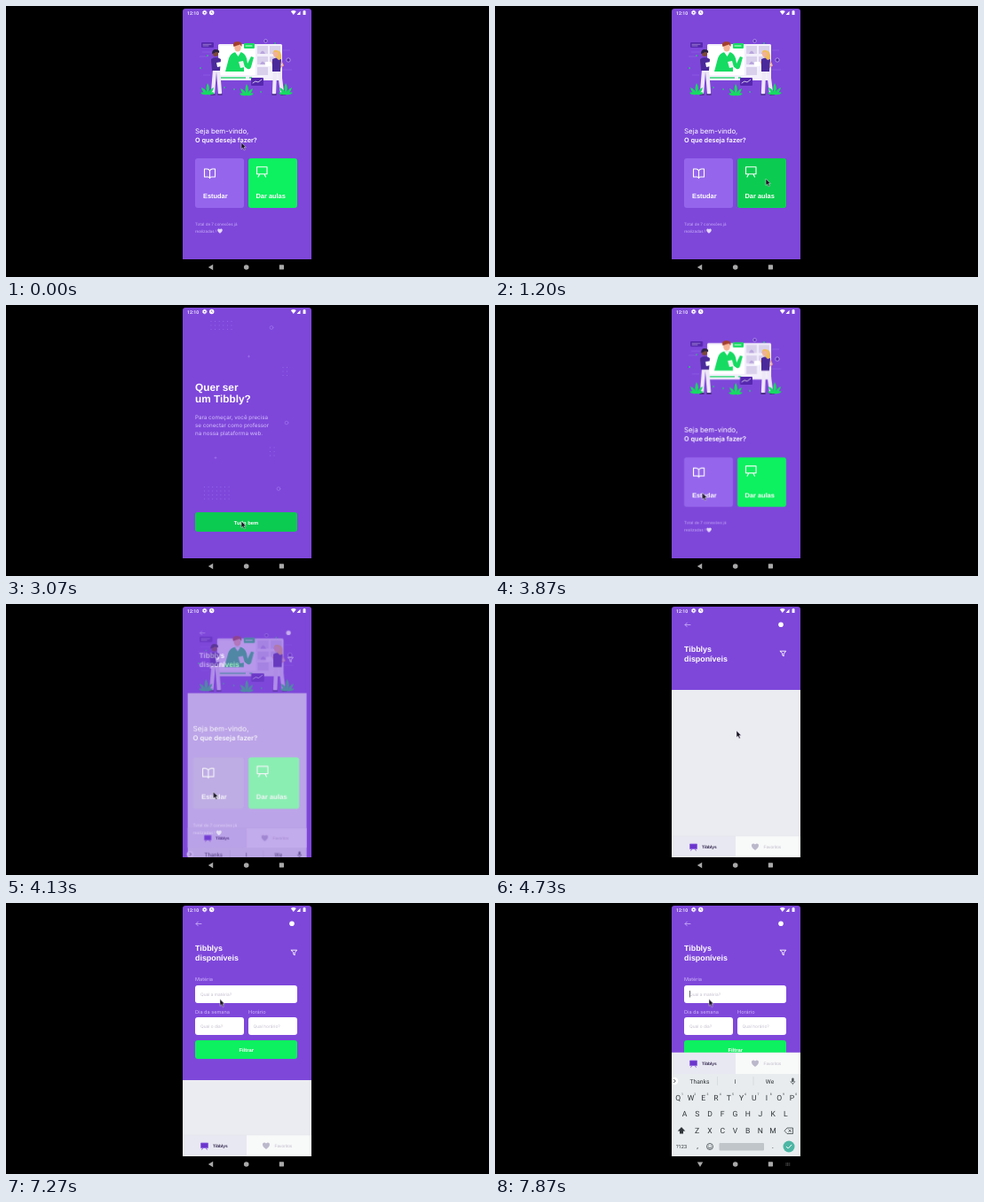
These frames come from a looping animation (544x306 px, 8 s). An HTML page:

```html
<!DOCTYPE html>
<html lang="pt-BR">
<head>
<meta charset="utf-8">
<title>App de aulas</title>
<style>
html, body { margin: 0; width: 100%; height: 100%; overflow: hidden; background: #000; }
svg { display: block; width: 544px; height: 306px; }
text { font-family: Inter, sans-serif; fill: #fff; text-rendering: geometricPrecision; white-space: pre; }
.bold { font-family: "Liberation Sans", Arial, sans-serif; font-weight: 700; }
.mid { text-anchor: middle; }
.title { font-size: 11.8px; }
.head { font-size: 8.9px; }
.label { font-size: 5.6px; fill: #cdb4f8; }
.hint { font-size: 4.8px; fill: #c4bfce; }
.tab { font-size: 4.8px; }
.keys, .keys text { font-family: Roboto, sans-serif; fill: #30363a; text-anchor: middle; }
.line { fill: none; stroke: #fff; stroke-linecap: round; stroke-linejoin: round; }
.deco { fill: none; stroke: #996de9; stroke-linecap: round; }
.purple { fill: #7e47da; }
.green { fill: #0df05f; }
.violet { fill: #9566ec; }
.dark { fill: #5527ae; }
.leaf { fill: #16db62; }

/* One loop is 120 ticks; 1 tick = 0.8333% */
.move, .scene, .press, .show { animation: 8s -5ms infinite step-end both; }
.scene { transform-origin: 271.5px 145px; }

.cursor { animation-name: cursor; }
@keyframes cursor {
  0% { transform: translate(265px, 154px); }
  6.667% { transform: translate(265px, 154px); animation-timing-function: steps(3); }
  9.167% { transform: translate(283px, 172px); animation-timing-function: steps(4); }
  12.5% { transform: translate(305px, 195px); }
  24.167% { transform: translate(253px, 146px); }
  25.833% { transform: translate(244px, 133px); }
  26.667% { transform: translate(239.5px, 125px); }
  28.333% { transform: translate(239.5px, 125px); animation-timing-function: steps(4); }
  31.667% { transform: translate(257px, 215px); animation-timing-function: steps(3); }
  34.167% { transform: translate(265px, 244px); }
  42.5% { transform: translate(265px, 244px); animation-timing-function: steps(5); }
  46.667% { transform: translate(233.5px, 212px); }
  57.5% { transform: translate(286px, 165px); }
  58.333% { transform: translate(278px, 150px); }
  59.167% { transform: translate(272px, 143px); }
  60% { transform: translate(272px, 143px); animation-timing-function: steps(4); }
  63.333% { transform: translate(250px, 120px); animation-timing-function: steps(7); }
  69.167% { transform: translate(320px, 58px); }
  79.167% { transform: translate(320px, 58px); animation-timing-function: steps(6); }
  84.167%, 88.333% { transform: translate(217px, 51px); }
  89.167% { transform: translate(230px, 85px); }
  90% { transform: translate(248px, 112px); }
  90.833%, 100% { transform: translate(241px, 108.5px); }
}

.home { animation-name: home; }
@keyframes home {
  0% { transform: none; }
  15.833% { transform: scale(1); animation-timing-function: steps(4); }
  19.167% { transform: scale(1.1); }
  39.167% { transform: scale(1.1); animation-timing-function: steps(3); }
  41.667% { transform: scale(1); }
  50% { transform: scale(1); animation-timing-function: steps(5); }
  54.167%, 100% { transform: scale(1.1); }
}
.teach { animation-name: teach; }
@keyframes teach {
  0% { opacity: 0; transform: scale(.85); }
  15.833% { opacity: 0; transform: scale(.85); animation-timing-function: steps(2); }
  17.5% { opacity: .8; transform: scale(.95); animation-timing-function: steps(2); }
  19.167% { opacity: 1; transform: scale(1); }
  39.167% { opacity: 1; transform: scale(1); animation-timing-function: steps(3); }
  41.667%, 100% { opacity: 0; transform: scale(.92); }
}
.list { animation-name: list; }
@keyframes list {
  0% { opacity: 0; transform: scale(.85); }
  50% { opacity: 0; transform: scale(.85); animation-timing-function: steps(3); }
  52.5% { opacity: .85; transform: scale(.96); animation-timing-function: steps(2); }
  54.167%, 100% { opacity: 1; transform: scale(1); }
}

.tap-teach { animation-name: tap-teach; }
@keyframes tap-teach {
  0% { opacity: 0; }
  14.167% { opacity: .08; }
  15% { opacity: .15; }
  17.5%, 100% { opacity: 0; }
}
.tap-ok { animation-name: tap-ok; }
@keyframes tap-ok {
  0% { opacity: 0; }
  37.5% { opacity: .08; }
  38.333% { opacity: .15; }
  40%, 100% { opacity: 0; }
}
.tap-study { animation-name: tap-study; }
@keyframes tap-study {
  0% { opacity: 0; }
  49.167% { opacity: .12; }
  52.5%, 100% { opacity: 0; }
}
.tap-filter { animation-name: tap-filter; }
@keyframes tap-filter {
  0% { opacity: 0; }
  73.333% { opacity: .18; }
  75.833% { opacity: .08; }
  76.667%, 100% { opacity: 0; }
}
.form { animation-name: form; }
@keyframes form {
  0% { opacity: 0; }
  75%, 100% { opacity: 1; }
}
.focus { animation-name: focus; }
@keyframes focus {
  0% { opacity: 0; }
  95.833%, 100% { opacity: 1; }
}
.blur { animation-name: blur; }
@keyframes blur {
  0% { opacity: 1; }
  95.833%, 100% { opacity: 0; }
}
.sheet { animation-name: sheet; }
@keyframes sheet {
  0% { transform: translateY(93px); }
  95.833% { transform: translateY(93px); animation-timing-function: steps(3); }
  98.333%, 100% { transform: translateY(0); }
}
</style>
</head>
<body>
<svg viewBox="0 0 544 306">
<defs>
  <clipPath id="screen"><path d="M199 286V6q0-3 3-3h139q3 0 3 3v280z"/></clipPath>
  <path id="heart" d="M0 3.8C-6-.2-4-3.9-1.8-3.7-.8-3.6-.2-3 0-2.4.2-3 .8-3.6 1.8-3.7 4-3.9 6-.2 0 3.8z"/>
  <g id="plant">
    <path class="leaf" d="M0 0Q-6-2-7-8-1-6 0 0Q-3-7 0-13 4-7 0 0Q2-6 7-8 6-2 0 0zM0 0Q-6 1-8-2-3-4 0 0Q4-4 8-2 5 1 0 0z"/>
  </g>
</defs>
<rect width="544" height="306"/>

<g clip-path="url(#screen)">
  <g class="scene home">
    <rect class="purple" x="180" y="-20" width="184" height="330"/>

    <!-- illustration -->
    <g>
      <path d="M221 52h16M218 57h9M312 50h8M311 72h11M222 78h8" stroke="#9164e4" stroke-width=".6"/>
      <rect class="dark" x="220" y="41" width="14" height="6" rx="1"/>
      <path class="line" d="M222 43.3h9M222 45h6" stroke-width=".6" opacity=".6"/>
      <rect x="239" y="43" width="72" height="41" rx="1.5" fill="#f3effb"/>
      <rect x="241" y="45" width="40" height="33" fill="#fff"/>
      <path d="M283 45h12v9h-12zM297 45h12v9h-12zM283 57h12v9h-12zM297 57h12v9h-12zM283 69h12v9h-12z" fill="#d9d0ec"/>
      <path d="M286 54q3-7 6 0zM300 54q3-7 6 0zM286 66q3-7 6 0z" fill="#b9a6dd"/>
      <path d="M242 81h28M274 81h3" stroke="#30d976" stroke-width="1.4"/>
      <path class="leaf" d="M247 74l4-15q2-6 8-7h5q5 1 7 7l1 6 4-8 3 1-3 11q-1 3-4 2l-4-3v6z"/>
      <path d="M258 52l3.5 5 3-5z" fill="#fff"/>
      <ellipse cx="261" cy="47" rx="3.7" ry="4.6" fill="#f6b596"/>
      <path d="M256.5 46q-2-5 3-5.700 7-1 6 5.700l-2-2.500q-4 1-7 2.500z" fill="#a3402c"/>
      <path d="M262 63l5-1 2 7-5 1z" fill="#eef5f0"/>
      <rect class="leaf" x="268" y="42" width="12" height="6" rx="1"/>
      <path class="line" d="M270 45h7" stroke-width=".8"/>
      <g stroke-linecap="round">
        <path d="M235 73l-2 25M239 73l2 25" stroke="#eee8f7" stroke-width="4.200"/>
        <path d="M231 100h4M239 100h4" stroke="#46307b" stroke-width="1.600"/>
        <path d="M232 62l2 7 6-4" fill="none" stroke="#7b4838" stroke-width="1.800"/>
        <path d="M303 74l-1 24M308 74l3 24" stroke="#eee8f7" stroke-width="4.200"/>
        <path d="M300 100h4M310 100h4" stroke="#46307b" stroke-width="1.600"/>
        <path d="M309 61l3 6-6 4M302 61l-5 5" fill="none" stroke="#f2b197" stroke-width="1.600"/>
      </g>
      <path d="M231 60q5-4 11 0l-1 13h-9z" fill="#4a2a9b"/>
      <circle cx="236" cy="54" r="3" fill="#7b4838"/>
      <path d="M232 54q0-5 4-5 5 0 4 4-4-2-5 0z" fill="#2d2145"/>
      <path d="M237 64l6-1v5l-5 1z" fill="#fff"/>
      <path d="M300 60q5-3 10 0l-1 14h-9z" fill="#4a2a9b"/>
      <path d="M301 55q-1-6 4-5 6 0 5 10l-3 1z" fill="#f0bd5c"/>
      <circle cx="303.700" cy="54.500" r="2.800" fill="#f2b197"/>
      <rect x="292" y="63" width="7" height="5" rx="1" fill="#fff"/>
      <rect class="dark" x="276" y="81" width="14" height="9" rx="1"/>
      <path class="line" d="M278 87l3-2 3 1 4-3" stroke-width=".7"/>
      <use href="#plant" x="227" y="100"/>
      <use href="#plant" x="271" y="102" transform="translate(0 -1)"/>
      <use href="#plant" x="315" y="100"/>
      <g class="dark" stroke="#c9b3f4" stroke-width=".7">
        <circle cx="292.500" cy="39.500" r="1.800"/><circle cx="318" cy="61" r="2.200"/>
      </g>
      <path d="M227 56h.1M219 70h.1M246 92h.1M257 94h.1M287 97h.1M303 42h.1" class="line" style="stroke:#1bd968" stroke-width="1.700"/>
    </g>

    <text x="213" y="143.700" font-size="7.800">Seja bem-vindo,</text>
    <text x="213" y="154" font-size="7.300" font-weight="600">O que deseja fazer?</text>

    <rect class="violet" x="213" y="172" width="55" height="56" rx="3"/>
    <rect class="press tap-study" x="213" y="172" width="55" height="56" rx="3"/>
    <rect class="green" x="273" y="172" width="55" height="56" rx="3"/>
    <rect class="press tap-teach" x="273" y="172" width="55" height="56" rx="3"/>
    <path class="line" stroke-width="1.100" d="M229.500 186q-1-2-3-2h-3v9h4q2 0 2 1.500 0-1.500 2-1.500h4v-9h-3q-2 0-3 2v8.500"/>
    <path class="line" stroke-width="1.100" d="M282.500 181.700h11.500v8h-11.500zM285.500 190l-1.500 3M291 190l1.500 3"/>
    <text class="bold" x="222" y="217" font-size="7.400">Estudar</text>
    <text class="bold" x="281.500" y="217" font-size="7.400">Dar aulas</text>

    <g font-size="4.500">
      <text x="213" y="247.800" style="fill:#c8aef6">Total de 7 conexões já</text>
      <text x="213" y="255.600" style="fill:#c8aef6">realizadas !</text>
    </g>
    <use href="#heart" transform="translate(241 254) scale(.7)" fill="#e3d5fa"/>
  </g>

  <g class="scene teach">
    <rect class="purple" x="199" y="3" width="145" height="283"/>
    <g class="deco" stroke-width="1" stroke-dasharray="0 4.600">
      <path d="M231 18.500h24M231 23h24M231 27.500h24"/>
      <path d="M223.500 205.500h29M223.500 210h29M223.500 214.500h29M223.500 219h29"/>
      <path d="M312 70.500h5M312 75h5M312 79.500h5M297.500 161h5M297.500 165.500h5M297.500 170h5"/>
    </g>
    <g class="deco" stroke-width=".9">
      <circle cx="299" cy="25.500" r="1.900"/><circle cx="316" cy="133" r="1.900"/><circle cx="307" cy="207.500" r="1.900"/>
      <path d="M272.500 58h2M273.500 57v2M235 172.500h2M236 171.500v2"/>
    </g>
    <text class="bold title" x="213" y="97.300">Quer ser</text>
    <text class="bold title" x="213" y="110.300">um Tibbly?</text>
    <g font-size="6.250">
      <text x="213" y="128.900" style="fill:#d3bffa">Para começar, você precisa</text>
      <text x="213" y="137.600" style="fill:#d3bffa">se conectar como professor</text>
      <text x="213" y="146.600" style="fill:#d3bffa">na nossa plataforma web.</text>
    </g>
    <rect class="green" x="213" y="234" width="115" height="22" rx="3"/>
    <rect class="press tap-ok" x="213" y="234" width="115" height="22" rx="3"/>
    <text class="bold mid" x="270.500" y="247.500" font-size="5.800">Tudo bem</text>
  </g>

  <g class="scene list">
    <rect x="199" y="3" width="145" height="283" fill="#ebecf2"/>
    <rect class="purple" x="199" y="3" width="145" height="94"/>
    <g class="show form">
      <rect class="purple" x="199" y="90" width="145" height="110"/>
      <text class="label" x="213" y="88.300">Matéria</text>
      <text class="label" x="213" y="125">Dia da semana</text>
      <text class="label" x="273" y="125">Horário</text>
      <g fill="#fff">
        <rect x="213" y="93" width="115" height="20" rx="3"/>
        <rect x="213" y="129" width="55" height="20" rx="3"/>
        <rect x="273" y="129" width="55" height="20" rx="3"/>
      </g>
      <text class="hint" x="219" y="104.700">Qual a matéria?</text>
      <text class="hint" x="219" y="140.800">Qual o dia?</text>
      <text class="hint" x="278.500" y="140.800">Qual horário?</text>
      <rect class="green" x="213" y="155" width="115" height="21" rx="3"/>
      <text class="bold mid" x="270.700" y="168" font-size="5.800">Filtrar</text>
    </g>
    <path class="show focus" d="M219.500 99v7.500" stroke="#40444a" stroke-width=".8"/>

    <path class="line" style="stroke:#cdb4f8" stroke-width=".8" d="M220 23.500h-6l2.300-2.300M214 23.500l2.300 2.300"/>
    <circle cx="322" cy="23.300" r="2.800" fill="#fff"/>
    <text class="bold head" x="213" y="53.700">Tibblys</text>
    <text class="bold head" x="213" y="64.700">disponíveis</text>
    <circle class="press tap-filter" cx="324.500" cy="56" r="8" fill="#fff"/>
    <path class="line" stroke-width=".9" d="M321.300 53.200h6.400l-2.500 3v2.700l-1.400-.8v-1.900z"/>

    <g class="move sheet">
      <rect x="199" y="169" width="72" height="24" fill="#e8e8f2"/>
      <rect x="271" y="169" width="73" height="24" fill="#f8f9f9"/>
      <path d="M199 169h145" stroke="#e0e0ea" stroke-width=".5"/>
      <path d="M219.500 178h8v5.500h-8z" fill="#6b35cd" stroke="#8b5fe0" stroke-width=".8"/>
      <path d="M221.500 184l-1 1.600M225.500 184l1 1.600" stroke="#7e47da" stroke-width=".9"/>
      <text class="bold tab" x="233" y="182.800" style="fill:#32264d">Tibblys</text>
      <use href="#heart" x="293" y="181.200" fill="#bbb8cc"/>
      <text class="bold tab" x="302.500" y="182.800" style="fill:#c1bccc;font-weight:400">Favoritos</text>

      <g class="keys">
        <rect x="199" y="193" width="145" height="93" fill="#e8ecee"/>
        <circle cx="202" cy="201" r="4.300" fill="#fff"/>
        <path d="M201.300 199l2 2-2 2" fill="none" stroke="#3c4448" stroke-width=".9"/>
        <path d="M250.500 196v10M291 196v10" stroke="#cdd3d6" stroke-width=".6"/>
        <g font-size="6.700">
          <text x="230.500" y="203.700">Thanks</text>
          <text x="270.500" y="203.700">I</text>
          <text x="309.500" y="203.700">We</text>
        </g>
        <rect x="334.200" y="197.500" width="2.400" height="4.600" rx="1.200" fill="#4c5458"/>
        <path d="M333 201q0 2.500 2.400 2.500t2.400-2.500M335.400 203.500v1.700" fill="none" stroke="#4c5458" stroke-width=".7"/>
        <g font-size="8.600">
          <text x="206.200 220.500 234.700 249 263.200 277.500 291.700 306 320.200 334.500" y="222.600">QWERTYUIOP</text>
          <text x="213.500 227.700 242 256.200 270.400 284.700 298.900 313.100 327.300" y="241.400">ASDFGHJKL</text>
          <text x="227.700 242 256.200 270.400 284.700 298.900 313.100" y="260.200">ZXCVBNM</text>
          <text x="228 313" y="277.200">,.</text>
        </g>
        <text x="211 225.300 239.500 253.800 268 282.300 296.500 310.800 325 339.300" y="216.500" font-size="3.400">1234567890</text>
        <text x="210" y="277.200" font-size="5.600">?123</text>
        <path d="M210 253l4.300 4.400h-2.300v3.200h-4v-3.200h-2.300z"/>
        <path d="M329 254h6.500v6.500H329l-3-3.250zM330.500 255.600l3.300 3.300M333.800 255.600l-3.300 3.300" fill="none" stroke="#3c4448" stroke-width=".8"/>
        <circle cx="242" cy="275" r="3.500" fill="none" stroke="#3c4448" stroke-width=".8"/>
        <path d="M240.700 274h.1M243.200 274h.1M240 276q2 2.200 4 0" fill="none" stroke="#3c4448" stroke-width=".8" stroke-linecap="round"/>
        <rect x="252.500" y="271" width="50.500" height="8.500" rx="1" fill="#bfc5c9"/>
        <circle cx="331" cy="275" r="6.500" fill="#4db6a4"/>
        <path class="line" stroke-width="1" d="M328.300 275.200l1.900 1.900 3.700-3.900"/>
      </g>
    </g>
  </g>

  <!-- status bar -->
  <text x="204" y="9.500" font-size="5.200" font-weight="500" style="font-family:Roboto,sans-serif">12:10</text>
  <circle cx="223.700" cy="7.500" r="1.500" class="line" stroke-width="1.300"/>
  <circle cx="223.700" cy="7.500" r="2.300" class="line" stroke-width=".8" stroke-dasharray=".5 1.300"/>
  <circle cx="231.700" cy="7.500" r="2.700" fill="#fff"/>
  <path d="M231.700 6v1.700l1.100.7" fill="none" stroke="#7e47da" stroke-width=".7"/>
  <path d="M320.800 6q3-2.200 6 0l-3 4zM327.500 10h4V5.700z" fill="#fff"/>
  <path d="M334.600 5.600h.8v-.7h1.300v.7h.8V10h-2.900z" fill="#fff"/>
</g>

<!-- navigation bar -->
<g fill="#a9a9a9">
  <path class="show blur" d="M227.800 295l5.400-3.200v6.400z"/>
  <path class="show focus" d="M231 298l-3.200-5.400h6.400z"/>
  <circle cx="270.700" cy="295" r="2.800"/>
  <rect x="307.800" y="292.300" width="5.200" height="5.200" rx=".4"/>
  <path class="show focus" d="M327.500 294h5M327.500 296h5" fill="none" stroke="#777" stroke-width="1" stroke-dasharray="1 .6"/>
</g>

<g class="move cursor">
  <path d="M0 0v7.600l1.700-1.500 1.300 2.800 1.300-.6-1.300-2.700h2.300z" fill="#17131f" stroke="#e9e4f2" stroke-width=".5"/>
</g>
</svg>
</body>
</html>
```
